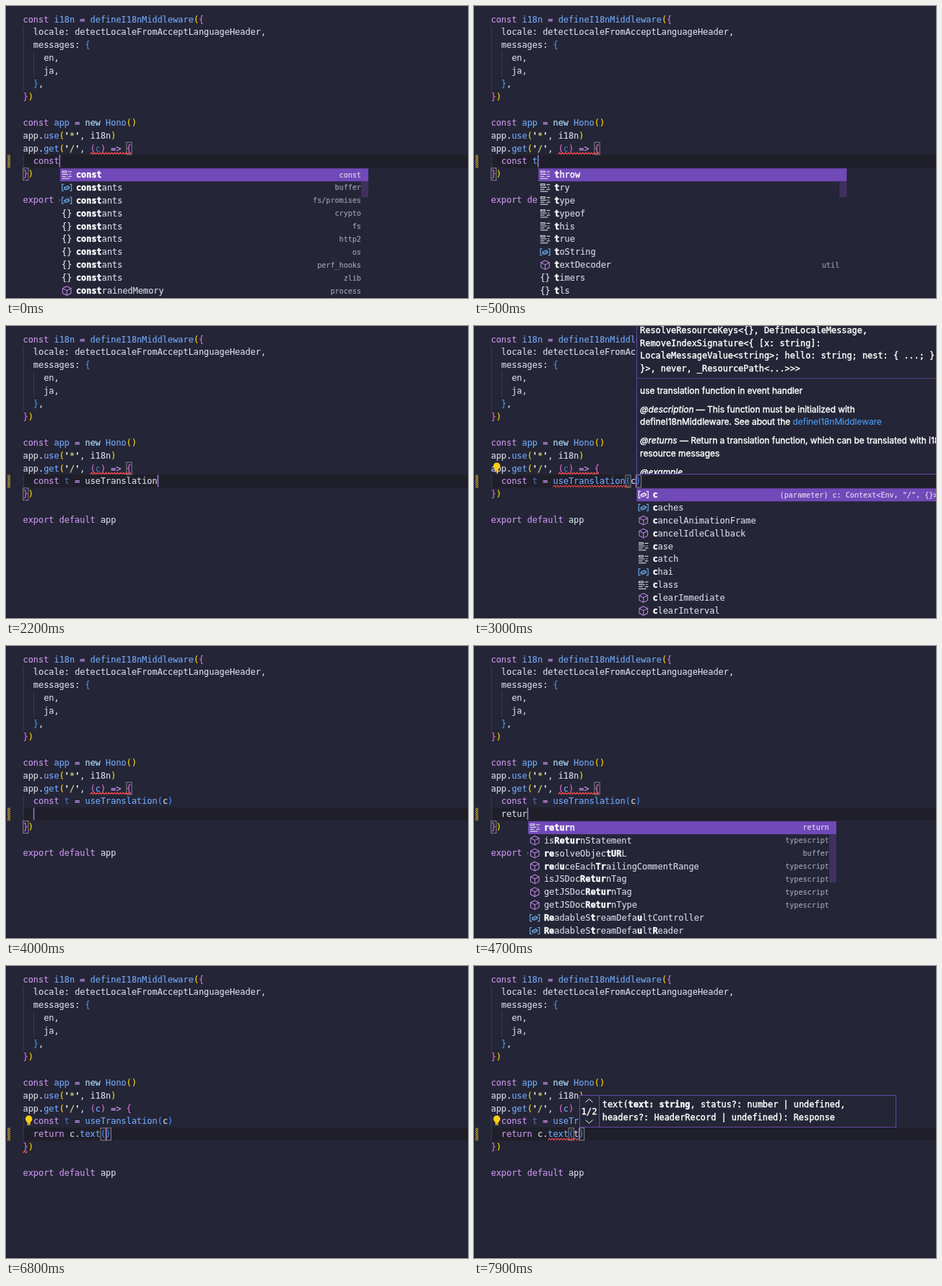
Recreate the animation shown at these times as an HTML page with a canvas. Size 640 by 405 pixels, loop 8 s.

```html
<!DOCTYPE html>
<html lang="en">
<head>
<meta charset="utf-8">
<title>Editor typing</title>
<style>
html, body { margin: 0; width: 100%; height: 100%; overflow: hidden; background: #242536; }
canvas { display: block; width: 640px; height: 405px; }
</style>
</head>
<body>
<canvas id="stage" width="640" height="405"></canvas>
<script>
const ctx = document.getElementById('stage').getContext('2d');
const LOOP = 8000, STEP = 100;
const LEFT = 23.5, CHAR = 7.164, ROW = 17.9, BASE = 22.5;
const MONO = '"DejaVu Sans Mono", monospace', SANS = 'Inter, sans-serif';
const CODE = '11.9px ' + MONO, BOLD = 'bold ' + CODE, DETAIL = '10.1px ' + MONO;
const C = {
  bg: '#242536', line: '#1f1f2a', panel: '#242536', select: '#7149b8', border: '#6247a8',
  text: '#d5d8e6', keyword: '#c792ea', name: '#70a5f5', fresh: '#b5e0fa', quote: '#e2f2ff',
  string: '#d8e37a', dim: '#4c6fa5', guide: '#3b3c50', error: '#f14c4c', yellow: '#ffcc18'
};
const BRACKETS = ['#ffd700', '#da70d6', '#3f96f5'];

const HEAD = [
  'const i18n = defineI18nMiddleware({',
  '  locale: detectLocaleFromAcceptLanguageHeader,',
  '  messages: {', '    en,', '    ja,', '  },', '})', '',
  'const app = new Hono()', "app.use('*', i18n)", "app.get('/', (c) => {"
];
const TAIL = ['})', '', 'export default app'];
const DONE = '  const t = useTranslation(c)';

// Each entry is "icon label detail"; bars switch bold on and off in the label.
const LISTS = {
  const: ['k |const| const', 'v |const|ants buffer', 'v |const|ants fs/promises', 'm |const|ants crypto',
    'm |const|ants fs', 'm |const|ants http2', 'm |const|ants os', 'm |const|ants perf_hooks',
    'm |const|ants zlib', 'f |const|rainedMemory process'],
  t: ['k |t|hrow', 'k |t|ry', 'k |t|ype', 'k |t|ypeof', 'k |t|his', 'k |t|rue', 'v |t|oString',
    'f |t|extDecoder util', 'm |t|imers', 'm |t|ls'],
  use: ['f |use|Translation @intlify/hono', 'f |use|rInfo os', 'f |U|int8Array|se|t', 'f |use|dMemory process',
    'v |use|rAgent', 'f f|u|lfillRespon|se|', 'f req|u|e|s|tIdl|e|Callback', 'f q|ue|ryObjects', 'f |u|n|s|ubscrib|e|',
    'f |u|pdateSour|se|'],
  c: ['v |c| (parameter) c: Context<Env, "/", {}>', 'v |c|aches', 'f |c|ancelAnimationFrame',
    'f |c|ancelIdleCallback', 'k |c|ase', 'k |c|atch', 'v |c|hai', 'k |c|lass',
    'f |c|learImmediate', 'f |c|learInterval'],
  return: ['k |retur|n return', 'f is|Retur|nStatement typescript', 'f |re|solveObjec|tUR|L buffer',
    'f |re|d|u|ceEach|Tr|ailingCommentRange typescript', 'f isJSDoc|Retur|nTag typescript',
    'f getJSDoc|Retur|nTag typescript', 'f getJSDoc|Retur|nType typescript',
    'v |Re|adableS|t|reamDefa|u|ltController', 'v |Re|adableS|t|reamDefa|u|lt|R|eader'],
  members: ['f body', 'v env', 'v error', 'v event', 'v executionCtx', 'v finalized', 'f get', 'f header', 'f html'],
  te: ['f |te|xt', 'f no|t|Found|e|', 'v execu|t|ionC|t|x', 'f s|t|r|e|am', 'v fini|te|']
};

const BODY_ERROR = [10, 13, 21];
// Changes accumulate: each entry overrides the fields it names.
const TIMELINE = [
  [0, { row: 11, text: '  const', back: 0, list: 'const', hint: '', bulb: 0, dimC: true, dimT: false, errors: [BODY_ERROR] }],
  [200, { text: '  const ', list: '' }],
  [400, { text: '  const t' }],
  [500, { list: 't' }],
  [700, { text: '  const t ', list: '' }],
  [900, { text: '  const t =' }],
  [1000, { text: '  const t = ', errors: [BODY_ERROR, [11, 2, 7]] }],
  [1300, { text: '  const t = u' }],
  [1400, { text: '  const t = us' }],
  [1500, { text: '  const t = use', list: 'use' }],
  [1900, { text: '  const t = useT' }],
  [2100, { text: '  const t = useTranslation', list: '', dimT: true, errors: [BODY_ERROR] }],
  [2400, { text: '  const t = useTranslation()', back: 1 }],
  [2600, { hint: 'doc', errors: [BODY_ERROR, [11, 12, 27]] }],
  [2800, { bulb: 10 }],
  [2900, { text: DONE }],
  [3000, { list: 'c' }],
  [3300, { list: '', dimC: false, errors: [BODY_ERROR] }],
  [3500, { back: 0, hint: '', bulb: 0 }],
  [3600, { row: 12, text: '  ' }],
  [4300, { text: '  r' }],
  [4400, { text: '  re' }],
  [4500, { text: '  ret', list: 'return' }],
  [4600, { text: '  retu' }],
  [4700, { text: '  retur' }],
  [4800, { text: '  return' }],
  [5000, { text: '  return ', list: '' }],
  [5400, { text: '  return c' }],
  [5500, { text: '  return c.' }],
  [5700, { list: 'members' }],
  [5900, { text: '  return c.t', list: 'te' }],
  [6000, { text: '  return c.te' }],
  [6300, { text: '  return c.text', list: '' }],
  [6600, { text: '  return c.text()', back: 1, errors: [[13, 0, 1]] }],
  [6700, { bulb: 11 }],
  [7000, { hint: 'signature' }],
  [7300, { errors: [] }],
  [7800, { text: '  return c.text(t)', bulb: 0 }],
  [7900, { bulb: 11, errors: [[12, 11, 17]] }]
];

const stateAt = t => Object.assign({}, ...TIMELINE.filter(([at]) => at <= t).map(([, s]) => s));
const colX = col => LEFT + col * CHAR;
const rowTop = row => 9.6 + row * ROW;

function rect(x, y, w, h, color) {
  ctx.fillStyle = color;
  ctx.fillRect(x, y, w, h);
}
function frame(x, y, w, h, color) {
  ctx.strokeStyle = color;
  ctx.lineWidth = 1;
  ctx.strokeRect(x, y, w, h);
}
function path(points, color, width = 1, closed = false) {
  ctx.beginPath();
  points.forEach(([x, y]) => ctx.lineTo(x, y));
  if (closed) ctx.closePath();
  ctx.strokeStyle = color;
  ctx.lineWidth = width;
  ctx.stroke();
}
// A hairline outline gives the text the weight of a smoothed screen font.
function write(str, x, y, color = C.text, font = CODE, align = 'left') {
  ctx.font = font;
  ctx.textAlign = align;
  ctx.fillStyle = ctx.strokeStyle = color;
  ctx.lineWidth = color === '#fff' ? .4 : .15;
  ctx.fillText(str, x, y);
  ctx.strokeText(str, x, y);
  return x + ctx.measureText(str).width;
}
function writeMarked(str, x, y, plain, mark = '|') {
  str.split(mark).forEach((part, i) => {
    write(part, x, y, i % 2 ? '#fff' : plain, i % 2 ? BOLD : CODE);
    x += part.length * CHAR;
  });
}

function tokenColor(token, before, after, s) {
  if (/^(const|return|export|default|=>?)$/.test(token)) return C.keyword;
  if (token === 'new') return C.fresh;
  if (token === 'c' && after.startsWith(') =>')) return s.dimC ? C.dim : C.name;
  if (/const $/.test(before)) return token === 't' && s.dimT ? C.dim : C.name;
  return /^\w/.test(token) && after[0] === '(' ? C.name : C.text;
}

function drawCode(lines, s) {
  let depth = 0;
  lines.forEach((line, row) => {
    const y = BASE + row * ROW;
    for (const m of line.matchAll(/'[^']*'|\w+|=>|[^\s\w]/g)) {
      const token = m[0], x = colX(m.index);
      if (token[0] === "'") {
        write("'", x, y, C.quote, BOLD);
        write(token.slice(1, -1), x + CHAR, y, C.string);
        write("'", x + CHAR * (token.length - 1), y, C.quote, BOLD);
        continue;
      }
      let color;
      if ('({'.includes(token)) color = BRACKETS[depth++ % 3];
      else if (')}'.includes(token)) color = BRACKETS[--depth % 3];
      else color = tokenColor(token, line.slice(0, m.index), line.slice(m.index + token.length), s);
      write(token, x, y, color);
    }
  });
}

function drawSquiggle([row, from, to]) {
  const y = BASE + row * ROW + 2.9, points = [];
  for (let x = colX(from), i = 0; x <= colX(to); x += 2, i++) points.push([x, y + (i % 2 ? -1.2 : 1.2)]);
  path(points, C.error, 1.1);
}

function drawGuides(lastRow) {
  const guide = (col, from, to) => rect(colX(col) + .2, rowTop(from), 1, (to - from) * ROW, C.guide);
  guide(0, 1, 6);
  guide(2, 3, 5);
  guide(0, 11, lastRow + 1);
}

function drawGutter(row) {
  const y = rowTop(row);
  ctx.save();
  ctx.beginPath();
  ctx.rect(2, y, 4, ROW);
  ctx.clip();
  for (let d = -4; d < 24; d += 3) path([[1, y + d + 4], [7, y + d - 1]], '#d9b52c', 1.2);
  ctx.restore();
}

function drawBracketPair(s, cursor) {
  const box = (col, row) => frame(colX(col) + .2, rowTop(row) + .4, CHAR, ROW - 1, '#85858c');
  const close = s.text.indexOf(')');
  if (close >= 0 && (cursor === close || cursor === close + 1)) {
    box(s.text.indexOf('('), s.row);
    box(close, s.row);
  } else {
    box(20, 10);
    box(0, s.row + 1);
  }
}

function drawBulb(row) {
  const y = BASE + row * ROW - 7.3;
  ctx.fillStyle = C.yellow;
  ctx.beginPath();
  ctx.arc(31.6, y, 4.8, 0, Math.PI * 2);
  ctx.fill();
  rect(29.4, y + 3, 4.4, 3.6, C.yellow);
  rect(29.4, y + 7.2, 4.4, 1.3, C.yellow);
}

function drawIcon(kind, x, y, selected) {
  const white = '#e2e2ea';
  if (kind === 'k') {
    frame(x - 6.2, y - 5, 5.8, 2, white);
    const bar = (dx, dy, w) => rect(x + dx, y + dy, w, 1.1, white);
    bar(1.9, -4.6, 4.8);
    bar(-6.7, -1, 8.6);
    bar(3.8, -1, 1.9);
    bar(-6.7, 1.9, 5.7);
    bar(1.9, 1.9, 4.8);
    bar(-6.7, 4.8, 10.5);
  } else if (kind === 'm') {
    write('{}', x, y + 4, white, CODE, 'center');
  } else if (kind === 'v') {
    const color = selected ? '#fff' : '#6fb3f2';
    for (const side of [-1, 1])
      path([[x + side * 4, y - 4.5], [x + side * 6.5, y - 4.5], [x + side * 6.5, y + 4.5], [x + side * 4, y + 4.5]], color, 1.1);
    path([[x - 3.5, y], [x + 1, y - 2.5], [x + 3.5, y - 1], [x + 3.5, y + 1], [x - 1, y + 3], [x - 3.5, y + 2]], color, 1.1, true);
    path([[x - 3.5, y], [x - 1, y + 1], [x + 3.5, y - 1]], color, .9);
  } else {
    const color = selected ? '#fff' : '#b180d7';
    path([[x, y - 6.3], [x + 5.8, y - 3.3], [x + 5.8, y + 3.3], [x, y + 6.3], [x - 5.8, y + 3.3], [x - 5.8, y - 3.3]], color, 1.1, true);
    path([[x - 5.8, y - 3.3], [x, y - .3], [x + 5.8, y - 3.3]], color, 1.1);
    path([[x, y - .3], [x, y + 6.3]], color, 1.1);
  }
}

function drawList(name, x, row) {
  const items = LISTS[name], top = rowTop(row + 1) + .9, width = 427;
  rect(x, top, width, items.length * ROW, C.panel);
  rect(x, top, width, ROW, C.select);
  if (items.length > 8) rect(x + width - 10, top + ROW, 10, name === 'return' ? 67 : 22, '#41305f');
  items.forEach((item, i) => {
    const [, icon, label, detail] = item.match(/^(\S+) (\S+) ?(.*)$/);
    const y = top + i * ROW + 8.6;
    drawIcon(icon, x + 9.3, y, i === 0);
    writeMarked(label, x + 22, y + 4, i ? C.text : '#fff');
    write(detail, x + width - 10, y + 3.6, i ? '#a0a1b2' : '#e4daf5', DETAIL, 'right');
  });
}

function drawDoc(x) {
  const font = '11.9px ' + SANS, italic = 'italic ' + font, white = '#fff', left = x + 4.6, bottom = 205;
  rect(x, 0, 640 - x, bottom, C.panel);
  ctx.save();
  ctx.beginPath();
  ctx.rect(x, 0, 640 - x, bottom);
  ctx.clip();
  ['ResolveResourceKeys<{}, DefineLocaleMessage,', 'RemoveIndexSignature<{ [x: string]:',
    'LocaleMessageValue<string>; hello: string; nest: { ...; }', '}>, never, _ResourcePath<...>>>'
  ].forEach((line, i) => write(line, left, 9.6 + i * ROW, white));
  rect(x, 72, 640 - x, 1, '#4a4188');
  write('use translation function in event handler', left, 93.6, white, font);
  let end = write('@description', left, 119.6, white, italic);
  write(' — This function must be initialized with', end, 119.6, white, font);
  end = write('defineI18nMiddleware. See about the ', left, 137.4, white, font);
  write('defineI18nMiddleware', end, 137.4, '#4b9bf5', font);
  end = write('@returns', left, 162.9, white, italic);
  write(' — Return a translation function, which can be translated with i18n', end, 162.9, white, font);
  write('resource messages', left, 180.9, white, font);
  write('@example', left, 206.6, white, italic);
  ctx.restore();
  path([[x, 0], [x, bottom + .5], [640, bottom + .5]], C.border);
}

function drawSignature(x) {
  const top = 179.5, white = '#fff';
  rect(x, top, 438, 44, C.panel);
  frame(x, top, 438, 44, C.border);
  path([[x + 27, top], [x + 27, top + 44]], C.border);
  const mid = x + 13;
  path([[mid - 5, 189], [mid, 184.5], [mid + 5, 189]], white);
  path([[mid - 5, 213.5], [mid, 218], [mid + 5, 213.5]], white);
  write('1/2', mid, 205.5, white, '12.2px ' + MONO, 'center');
  writeMarked('text(*text: string*, status?: number | undefined,', x + 31.3, 196, white, '*');
  write('headers?: HeaderRecord | undefined): Response', x + 31.3, 213.9, white);
}

function draw(t) {
  const s = stateAt(t), cursor = s.text.length - s.back, x = colX(cursor);
  const hintX = Math.floor(x + 1) + .5;
  const lines = [...HEAD, ...(s.row === 12 ? [DONE] : []), s.text, ...TAIL];
  rect(0, 0, 640, 405, C.bg);
  rect(LEFT, rowTop(s.row) - .4, 640 - LEFT, ROW, C.line);
  rect(0, 404, 640, 1, '#191a27');
  drawGuides(s.row);
  drawGutter(s.row);
  drawBracketPair(s, cursor);
  drawCode(lines, s);
  s.errors.forEach(drawSquiggle);
  rect(x, rowTop(s.row), 1.5, ROW - 1, '#a277d8');
  if (s.bulb) drawBulb(s.bulb);
  if (s.hint === 'doc') drawDoc(hintX);
  if (s.hint === 'signature') drawSignature(hintX);
  if (s.list) drawList(s.list, x + 1.3, s.row);
}

const start = performance.now();
function tick() {
  const t = (performance.now() - start) % LOOP;
  draw(Math.floor(t / STEP) * STEP);
  requestAnimationFrame(tick);
}
tick();
</script>
</body>
</html>
```
